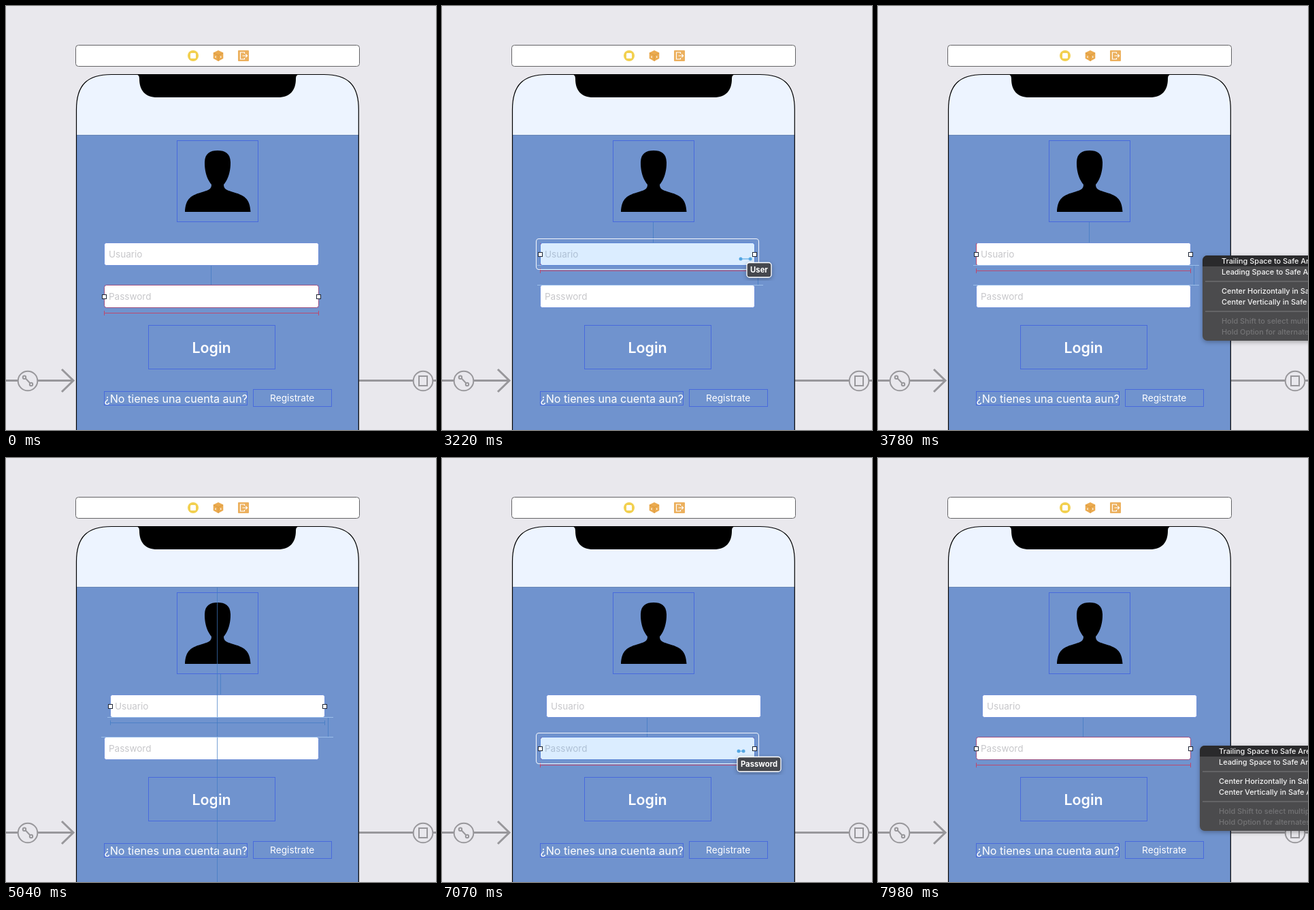
An HTML page for the animation above (8 s loop, 632 px wide and 622 px high).

```html
<!DOCTYPE html>
<html lang="es">
<head>
<meta charset="utf-8">
<title>Login storyboard</title>
<style>
html, body { margin: 0; width: 100%; height: 100%; overflow: hidden; background: #e9e8ed; }
svg { display: block; width: 632px; height: 622px; font-family: Inter, Roboto, sans-serif; }

.frame { fill: none; stroke: #4466de; stroke-opacity: .9; }
.field { fill: #fff; stroke: #5479d2; stroke-opacity: .7; }
.hint { font-size: 13.5px; fill: #c7c7ca; }
.wire { fill: none; stroke: #98979b; stroke-width: 2; }
.thick { stroke-width: 3; }
.red { fill: none; stroke: #c83e5e; stroke-opacity: .85; }
.edge { stroke: #a84672; }
.guide { fill: none; stroke: #3f7ac4; stroke-opacity: .7; }
.pale { fill: none; stroke: #a3c6ee; stroke-opacity: .85; }
.grip { fill: #fff; stroke: #1d2433; }
.tint { fill: #55a8ff; fill-opacity: .21; }
.rim { stroke: #5b86d6; }
.halo { fill: none; stroke: #fff; stroke-opacity: .9; stroke-width: 1.1; }
.tip rect { fill: #44474e; stroke: #fff; stroke-width: 1.3; }
.tip text { font-size: 11.3px; font-weight: 700; fill: #fff; text-anchor: middle; }
.link { fill: #53a6e2; stroke: #53a6e2; stroke-width: 1.1; }
.link .dot { stroke: none; }
.items { font-size: 10.9px; font-weight: 500; fill: #f4f4f4; }
.off { fill: #747476; }

/* One percent of the loop is 80 ms. */
.step { animation: 8s step-end infinite; }
.flow { animation: 8s linear infinite; }
.pass-on { animation-name: pass-on; }
.user-on { animation-name: user-on; }
.centred { animation-name: centred; }
.shift { animation-name: shift; }
.drag { animation-name: drag; }
.over { animation-name: over; }
.view { animation-name: view; }
.pull { animation-name: pull; }
.grow { animation-name: grow; }
.menu1 { animation-name: menu1; }
.menu2 { animation-name: menu2; }
.row { animation-name: row; }

/* The second drag repeats the first one 4.04 s later. */
.again, .again .flow { animation-delay: -3.96s; }

@keyframes pass-on { 0% { opacity: 1 } 14.4% { opacity: 0 } 76.1% { opacity: 1 } }
@keyframes user-on { 0% { opacity: 0 } 14.4% { opacity: 1 } 61.6% { opacity: 0 } }
@keyframes centred { 0% { opacity: 0 } 61.6% { opacity: 1 } 76.1% { opacity: 0 } }
@keyframes shift { 0% { transform: none } 61.6% { transform: translateX(9px) } }
@keyframes drag { 0% { opacity: 0 } 36.1% { opacity: 1 } 43.1% { opacity: 0 } }
@keyframes over { 0% { opacity: 0 } 36.1% { opacity: 1 } 41.2% { opacity: 0 } }
@keyframes view { 0% { opacity: 0 } 41.2% { opacity: 1 } 43.1% { opacity: 0 } }
@keyframes pull {
  0%, 36.1% { transform: none } 37.875% { transform: translateX(7px) }
  40.25% { transform: translateX(14px) } 42.25%, 100% { transform: translateX(38px) }
}
@keyframes grow {
  0%, 36.1% { transform: scaleX(0) } 37.875% { transform: scaleX(7) }
  40.25% { transform: scaleX(14) } 42.25%, 100% { transform: scaleX(38) }
}
@keyframes menu1 {
  0%, 43.09% { opacity: 0 } 43.1%, 60.4% { opacity: 1 } 62.1%, 100% { opacity: 0 }
}
@keyframes menu2 { 0% { opacity: 0 } 93.6% { opacity: 1 } }
@keyframes row {
  0% { transform: none } 50.7% { transform: translateY(16px) } 54.2% { transform: translateY(44px) }
}
</style>
</head>
<body>
<svg viewBox="0 0 632 622">
  <defs>
    <path id="phone" d="M103.5 640V152C103.5 116 119 100.5 155 100.5H467C503 100.5 518.3 116 518.3 152V640Z"/>
    <clipPath id="phone-clip"><use href="#phone"/></clipPath>
    <clipPath id="menu-clip"><rect width="180" height="125" rx="7"/></clipPath>
    <filter id="shadow" x="-20%" y="-20%" width="140%" height="140%">
      <feDropShadow dx="0" dy="2" stdDeviation="3" flood-opacity=".3"/>
    </filter>
    <g id="panel">
      <rect width="180" height="125" rx="7" fill="#4b4b4d" filter="url(#shadow)"/>
      <path d="M4 38H180M4 82H180" stroke="#6d6d6f" stroke-width="1.5"/>
    </g>
    <g id="items" class="items">
      <text x="28" y="12">Trailing Space to Safe Area</text>
      <text x="28" y="28">Leading Space to Safe Area</text>
      <text x="28" y="56">Center Horizontally in Safe Area</text>
      <text x="28" y="72">Center Vertically in Safe Area</text>
      <text x="28" y="100" class="off">Hold Shift to select multiple</text>
      <text x="28" y="116" class="off">Hold Option for alternates</text>
    </g>
    <g id="grips" class="grip">
      <rect x="141.5" y="-3" width="6" height="6"/>
      <rect x="456.5" y="-3" width="6" height="6"/>
    </g>
    <path id="width" d="M144.5 -3.5V3.5M459.5 -3.5V3.5M144.5 0H459.5"/>
    <g id="hover">
      <rect class="tint rim" x="144.5" y="6.5" width="315" height="33" rx="3"/>
      <use href="#grips" y="23.5"/>
      <rect class="halo" x="138.5" y=".5" width="327" height="45" rx="4"/>
    </g>
    <g id="view">
      <use href="#phone" class="tint"/>
      <rect class="halo" x="97.5" y="94.5" width="427" height="600" rx="4"/>
    </g>
    <g id="link" class="link">
      <path class="flow grow" d="M0 0H1"/>
      <circle class="dot" r="2.5"/>
      <circle class="dot flow pull" r="2.5"/>
    </g>
  </defs>

  <!-- Scene dock -->
  <rect x="102.5" y="57.5" width="417" height="31" rx="4" fill="#fff" stroke="#636366"/>
  <circle cx="275" cy="73" r="8" fill="#f2d04f"/>
  <rect x="271" y="69" width="8" height="8" rx="1.5" fill="#fff"/>
  <path d="M312 65L319.3 68.5V77L312 81L304.7 77V68.5Z" fill="#ebab50"/>
  <path d="M305 69L312 72.3L319 69M312 72.3V81" fill="none" stroke="#d7963c" stroke-width=".8"/>
  <path d="M308 73.5V76M315.7 73.5V76" stroke="#fff" stroke-width="1.2"/>
  <rect x="341" y="65" width="16" height="16" rx="1" fill="#ecb05e"/>
  <path d="M350.5 70V68H344.5V78H350.5V76M347.5 73H354.5M352.3 70.7L354.6 73L352.3 75.3" fill="none" stroke="#fff" stroke-width="1.2"/>

  <!-- Segues -->
  <path class="wire thick" d="M0 549.5H17M47 549.5H98M519 549.5H598M628 549.5H632"/>
  <path class="wire thick" d="M82 533L99 549.5L82 566"/>
  <circle class="wire" cx="32" cy="550" r="14.3"/>
  <path class="wire" d="M28.5 546L35.5 553.5"/>
  <circle class="wire" cx="27" cy="544.7" r="2.2"/>
  <circle class="wire" cx="37" cy="555" r="2.2"/>
  <circle class="wire" cx="613" cy="550" r="14.3"/>
  <rect class="wire" x="607" y="543" width="12" height="14"/>

  <!-- Phone -->
  <use href="#phone" fill="#edf4ff"/>
  <g clip-path="url(#phone-clip)">
    <rect x="103" y="189" width="416" height="440" fill="#7093ce"/>
    <path d="M103 189.5H519" stroke="#6785b4"/>
  </g>
  <path d="M189 100C194 100 196 102 196 107C196 124 205 134 222 134H400C417 134 426 124 426 107C426 102 428 100 433 100Z"/>
  <use href="#phone" fill="none" stroke="#000" stroke-width="1.2"/>

  <rect class="frame" x="251.5" y="197.5" width="119" height="119"/>
  <path d="M311 212C322 212 329.5 216 330 229C330.3 243 326 255 320 262C320 268.500 324 270 332 272.500C350 277.500 358.500 282 359.500 302H263C264 282 272 277.500 290 272.500C298 270 302 268.500 302 262C296 255 291.700 243 292 229C292.500 216 300 212 311 212Z"/>

  <g class="step shift">
    <rect class="field" x="144.5" y="347.5" width="315" height="33" rx="3"/>
    <text class="hint" x="151" y="368.8">Usuario</text>
  </g>
  <rect class="field" x="144.5" y="409.5" width="315" height="33" rx="3"/>
  <text class="hint" x="151" y="430.8">Password</text>

  <rect class="frame" x="209.5" y="468.5" width="186" height="64"/>
  <text x="302" y="508.5" font-size="21.4" font-weight="600" fill="#fff" text-anchor="middle">Login</text>
  <rect class="frame" x="144.5" y="565.5" width="210" height="20"/>
  <text x="144.5" y="581.5" font-size="16.1" fill="#fff">¿No tienes una cuenta aun?</text>
  <rect class="frame" x="363.5" y="562.5" width="115" height="25"/>
  <text x="420.7" y="580" font-size="13.7" fill="#fff" text-anchor="middle">Registrate</text>

  <!-- Selected password -->
  <g class="step pass-on">
    <path class="guide" d="M301.5 381V409"/>
    <rect class="red edge" x="144.5" y="409.5" width="315" height="33" rx="3"/>
    <use href="#width" class="red" y="450.5"/>
    <use href="#grips" y="426.5"/>
  </g>

  <!-- Selected user -->
  <g class="step user-on">
    <path class="guide" d="M310.5 317V347M464.5 381V409"/>
    <path class="pale" d="M140 380.5H472M140 409.5H472"/>
    <path class="red" d="M144.5 348V380"/>
    <use href="#width" class="red" y="388.5"/>
    <use href="#grips" y="364.5"/>
  </g>

  <!-- User centred in the safe area -->
  <g class="step centred">
    <path class="guide" d="M310.5 190V622M315.5 317V347M473.5 381V409"/>
    <path class="pale" d="M149 380.5H481M140 409.5H481"/>
    <g transform="translate(9 0)">
      <use href="#width" class="guide" y="388.5"/>
      <use href="#grips" y="364.5"/>
    </g>
  </g>

  <!-- Drags to a drop target -->
  <use href="#view" class="step view"/>
  <use href="#view" class="step view again"/>
  <use href="#hover" class="step over" y="341"/>
  <use href="#hover" class="step over again" y="403"/>

  <g class="step drag">
    <g class="link" transform="translate(439 371)">
      <path class="flow grow" d="M0 0H1"/>
      <circle class="dot" r="2.5"/>
      <circle class="dot flow pull" r="2.5"/>
    </g>
  </g>
  <g class="step drag again">
    <g class="link" transform="translate(436 430)">
      <path class="flow grow" d="M0 0H1"/>
      <circle class="dot" r="2.5"/>
      <circle class="dot flow pull" r="2.5"/>
    </g>
  </g>

  <g class="step over tip">
    <rect x="448" y="376.5" width="36" height="21.5" rx="4" filter="url(#shadow)"/>
    <text x="466" y="391.2">User</text>
  </g>
  <g class="step over again tip">
    <rect x="434" y="438.5" width="64" height="21.5" rx="4" filter="url(#shadow)"/>
    <text x="466" y="453.2">Password</text>
  </g>

  <!-- Constraint menus -->
  <g class="flow menu1">
    <g transform="translate(477 366)">
      <use href="#panel"/>
      <g clip-path="url(#menu-clip)"><rect class="step row" width="180" height="16" fill="#2a2a2c"/></g>
      <use href="#items"/>
    </g>
  </g>
  <g class="step menu2">
    <g transform="translate(473 422)">
      <use href="#panel"/>
      <g clip-path="url(#menu-clip)"><rect width="180" height="16" fill="#2a2a2c"/></g>
      <use href="#items"/>
    </g>
  </g>
</svg>
</body>
</html>
```
